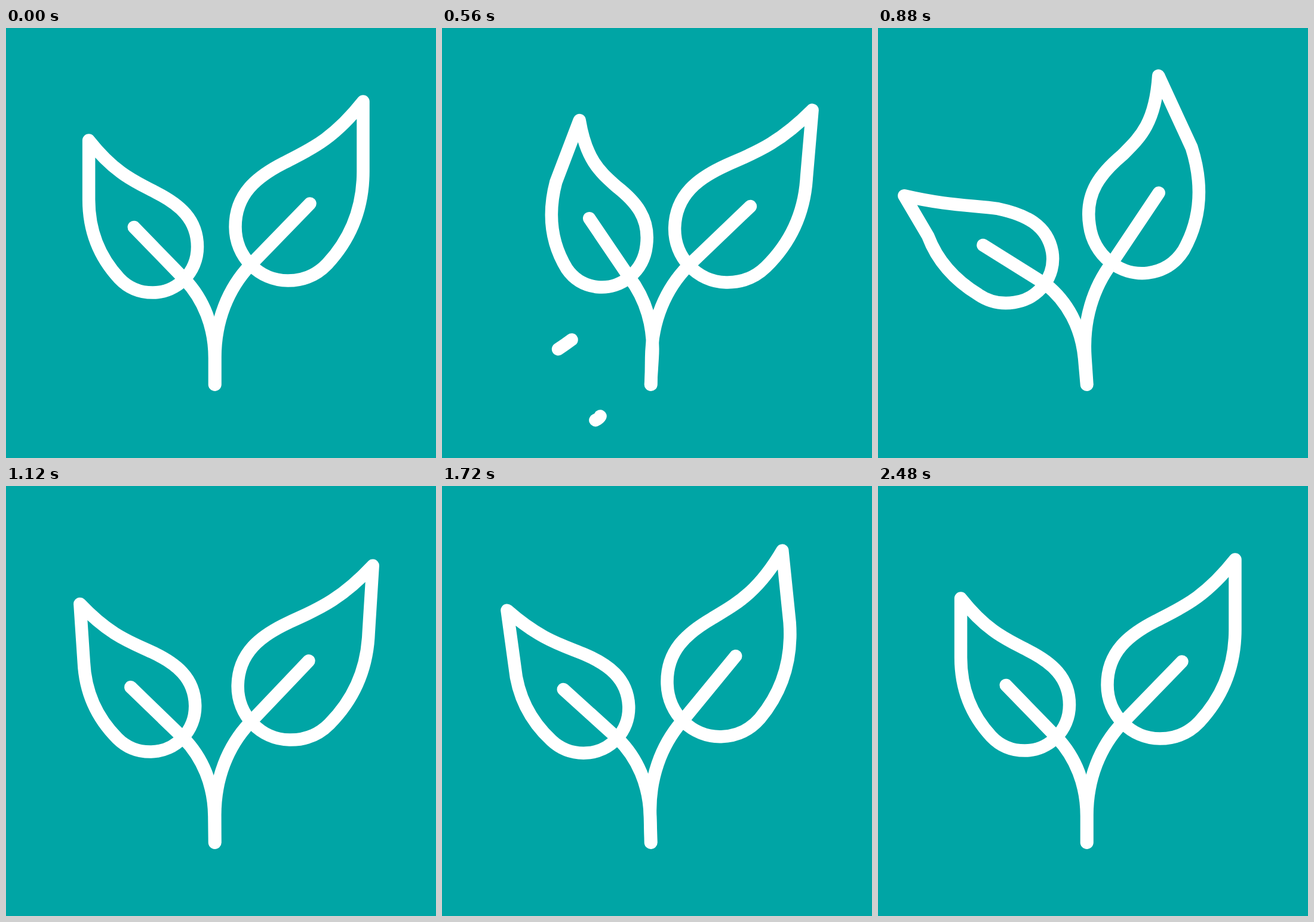
An HTML page for the animation above (3 s loop, 720 by 720 pixels).

```html
<!DOCTYPE html>
<html lang="en">
<head>
<meta charset="utf-8">
<title>Seedling in the wind</title>
<style>
  html, body { margin: 0; height: 100%; overflow: hidden; background: #00a5a5; }
  svg { display: block; width: 100vw; height: 100vh; }
  path { fill: none; stroke: #fff; stroke-width: 21.5; stroke-linecap: round; stroke-linejoin: round; }
</style>
</head>
<body>
<svg viewBox="0 0 720 720">
  <g id="plant"></g>
  <path class="gust" pathLength="1" d="M87 582C135 574 181 549 217 522"/>
  <path class="gust" pathLength="1" d="M150 654C190 660 256 668 265 650"/>
</svg>
<script>
const LOOP = 3000, STEP = 40, SWING = 400;
const ROOT = { x: 349.7, y: 597 };

// base: share of the tip angle already reached at the root; power: how late the rest follows.
const STEM = { base: 0.3, power: 2.2,
  d: 'M350 597L350 552C350 490 372 436 409 397L509 294' };
const LEAF = { base: 0.4, power: 3,
  d: 'M598 123C545 190 505 205 465 226C420 249 384 278 384 333' +
     'C384 383 424 423 472 423C498 423 520 414 538 395C578 352 598 300 598 240Z' };

// Swing lists hold the clockwise tip angle, in degrees, at the end of each swing.
const LEFT_SWINGS = [0, 15.2, -16.7, 5.5, -4.6, 1.65, 0];
const sprouts = [
  { side: -1, scale: 0.85, lift: 6, delay: 80, leaf: LEFT_SWINGS, stem: LEFT_SWINGS },
  { side: 1, scale: 1, lift: 0, delay: 0,
    leaf: [0, 13, -16.5, 4, -4.7, 1.6, 0],
    stem: [0, 11.4, -14.1, 0.7, -7.7, 1.4, 0] }
];
const GUST_ENDS = [635, 592];

const clamp = (v, lo = 0, hi = 1) => Math.min(hi, Math.max(lo, v));
const ease = p => (1 - Math.cos(Math.PI * p)) / 2;

function swingAngle(swings, time) {
  const p = clamp(time / SWING, 0, swings.length - 1);
  const i = Math.min(Math.floor(p), swings.length - 2);
  return swings[i] + (swings[i + 1] - swings[i]) * ease(p - i);
}

// Bends a shape around the root, more strongly towards the leaf tip.
function bend({ d, base, power }, { side, scale, lift }, angle) {
  const reach = 510 * scale + lift * Math.SQRT1_2;
  return d.replace(/(\d+) (\d+)/g, (_, px, py) => {
    const x = (px - ROOT.x) * scale;
    const y = (ROOT.y - py) * scale + (py < ROOT.y ? lift : 0);
    const along = Math.max(0, (x + y) * Math.SQRT1_2) / reach;
    const turn = angle * side * (base + (1 - base) * along ** power);
    const radius = Math.hypot(x, y) * (1 - 0.00092 * turn - 0.000102 * turn * turn);
    const a = Math.atan2(x, y) + turn * Math.PI / 180;
    const bx = ROOT.x + side * radius * Math.sin(a);
    const by = ROOT.y - radius * Math.cos(a);
    return `${bx.toFixed(2)} ${by.toFixed(2)}`;
  });
}

const plant = document.getElementById('plant');
const gusts = document.querySelectorAll('.gust');
const addPath = () => plant.appendChild(
  document.createElementNS('http://www.w3.org/2000/svg', 'path'));
for (const s of sprouts) {
  s.parts = [[addPath(), STEM, s.stem], [addPath(), LEAF, s.leaf]];
}

function draw(time) {
  for (const s of sprouts) {
    for (const [path, shape, swings] of s.parts) {
      path.setAttribute('d', bend(shape, s, swingAngle(swings, time - s.delay)));
    }
  }
  gusts.forEach((gust, i) => {
    const head = ease(clamp(time / 320));
    const tail = clamp((time - 240) / (GUST_ENDS[i] - 240));
    gust.style.display = head > tail ? '' : 'none';
    gust.style.strokeDasharray = `${Math.max(0, head - tail)} 3`;
    gust.style.strokeDashoffset = -tail;
  });
}

const start = performance.now();
function tick() {
  draw(Math.floor((performance.now() - start) % LOOP / STEP) * STEP);
  requestAnimationFrame(tick);
}
tick();
</script>
</body>
</html>
```
